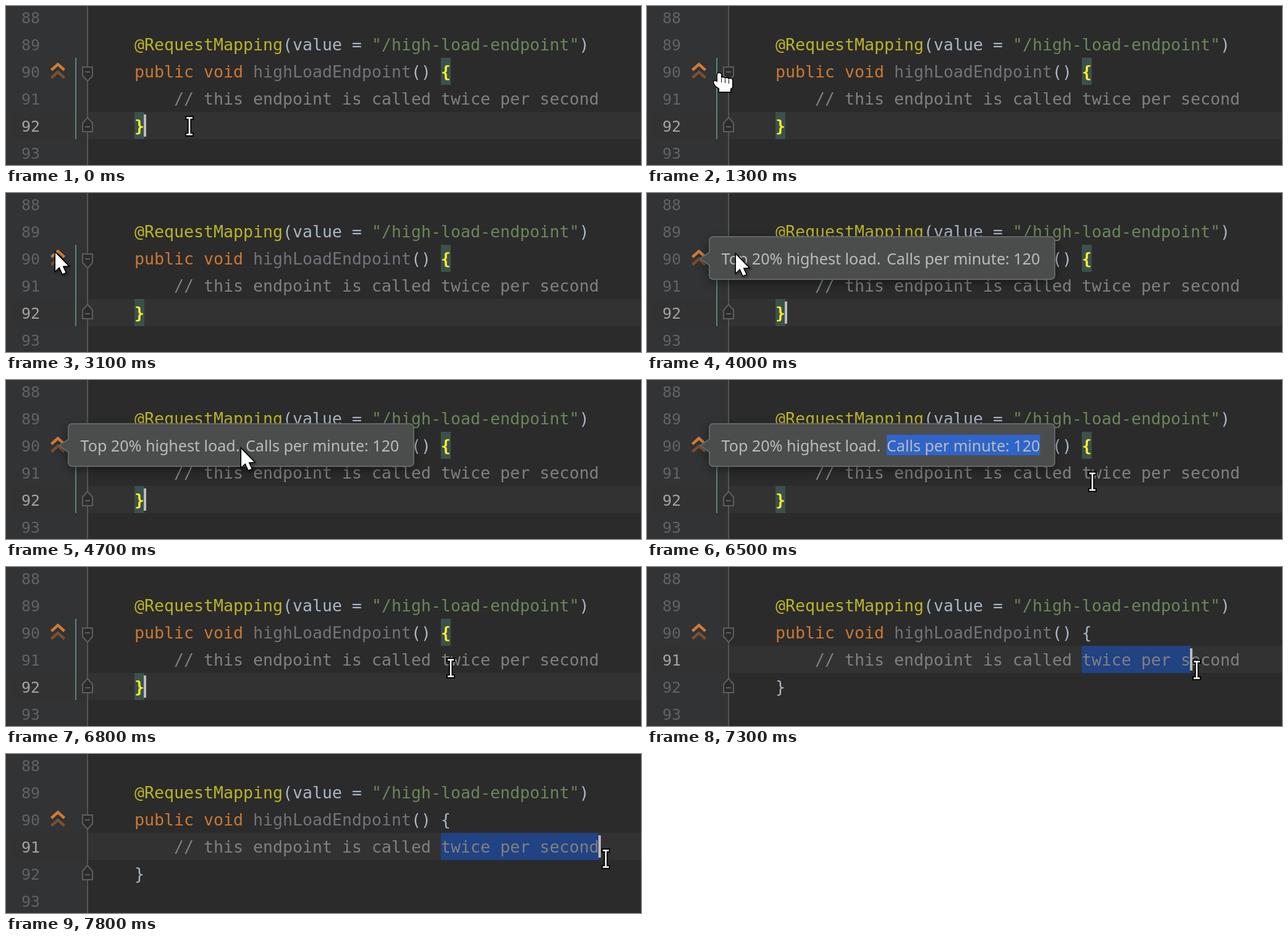
Recreate the animation shown at these times as an HTML page with a canvas. Size 1028 by 258 pixels, loop 8000 ms.

```html
<!DOCTYPE html>
<html lang="en">
<head>
<meta charset="utf-8">
<title>Endpoint load hint</title>
<style>
  html, body { margin: 0; width: 100%; height: 100%; overflow: hidden; background: #2b2b2b; }
  canvas { display: block; }
</style>
</head>
<body>
<canvas id="stage" width="1028" height="258"></canvas>
<script>
const ctx = document.getElementById('stage').getContext('2d');
const LOOP = 8000, STEP = 100, BLINK = 500;
const COL = 16, ROW = 44, LEFT = 208;
const MONO = '"DejaVu Sans Mono", monospace';
const CODE_FONT = '26.58px ' + MONO;
const LINE_FONT = '25px ' + MONO;
const HINT_FONT = '25.1px "Noto Sans", sans-serif';
const C = {
  bg: '#2b2b2b', gutter: '#313335', row: '#323232', fold: '#5c5e60',
  note: '#bbb529', key: '#cc7832', plain: '#a9b7c6', str: '#6a8759',
  dim: '#72737a', comment: '#808080', brace: '#ffef28', braceBg: '#3b514d',
  select: '#214283', hintSelect: '#2f65ca', scope: '#5a8577', caret: '#bbbbbb'
};

const settle = k => 1 - (1 - k) ** 2;
const smooth = k => k * k * (3 - 2 * k);
const glide = (from, to, x, y, ease = settle) => ({ from, to, x, y, ease });
const HOME = { x: 297, y: 195 };
const GLIDES = [
  glide(1000, 1500, 81, 94),
  glide(2100, 2300, 79, 95),
  glide(3900, 4800, 384, 110),
  glide(5000, 5600, 645, 110, smooth),
  glide(6100, 6500, 721, 165),
  glide(6500, 6700, 768, 169),
  glide(6700, 6800, 720, 164),
  glide(6900, 7500, 950, 168, smooth),
  glide(7600, 7800, 971, 170)
];
const HINT_FROM = 3600, HINT_TO = 6800, DRAG_HINT = 5100, DRAG_CODE = 7000;

const clamp = (v, lo, hi) => Math.max(lo, Math.min(hi, v));

function mouseAt(t) {
  let { x, y } = HOME;
  for (const g of GLIDES) {
    const k = g.ease(clamp((t - g.from) / (g.to - g.from), 0, 1));
    x += (g.x - x) * k;
    y += (g.y - y) * k;
  }
  return { x: Math.round(x), y: Math.round(y) };
}

const rowTop = n => (n - 88) * ROW - 4;
const colX = c => LEFT + c * COL;

function box(color, x, y, w, h) {
  ctx.fillStyle = color;
  ctx.fillRect(x, y, w, h);
}

function text(s, x, y, color, font) {
  ctx.font = font;
  ctx.fillStyle = color;
  ctx.fillText(s, x, y);
}

function code(line, col, s, color, weight = '') {
  text(s, colX(col), rowTop(line) + 32, color, weight + CODE_FONT);
}

function trace(points, close) {
  ctx.beginPath();
  points.forEach(([x, y]) => ctx.lineTo(x, y));
  if (close) ctx.closePath();
}

function stroke(color, width) {
  ctx.strokeStyle = color;
  ctx.lineWidth = width;
  ctx.stroke();
}

function foldMark(y, dir) {
  trace([[124, y - 8 * dir], [140, y - 8 * dir], [140, y + 6 * dir], [132, y + 15 * dir], [124, y + 6 * dir]], true);
  ctx.fillStyle = C.bg;
  ctx.fill();
  stroke(C.fold, 2);
  trace([[128, y], [136, y]]);
  stroke(C.fold, 2);
}

function chevron(y, color) {
  trace([[73.5, y + 9.5], [84, y], [94.5, y + 9.5]]);
  stroke(color, 4.5);
}

function drawGutter(current) {
  box(C.gutter, 0, 0, 131, 258);
  box(C.row, 8, rowTop(current), 1020, ROW);
  box('#555555', 131, 0, 2, 258);
  if (current === 92) box(C.scope, 112, 84, 2, 132);
  for (let n = 88; n <= 93; n++)
    text(n, 25, rowTop(n) + 32, n === current ? '#a4a3a3' : '#606366', LINE_FONT);
  chevron(107, '#794f30');
  chevron(94.5, '#d07a35');
  foldMark(107, 1);
  foldMark(196, -1);
}

function drawCode(current, selectEnd) {
  const matched = current === 92;
  if (matched) {
    box(C.braceBg, colX(31), rowTop(90), COL, ROW);
    box(C.braceBg, colX(0), rowTop(92), COL, ROW);
  } else {
    box(C.select, colX(31), rowTop(91), colX(selectEnd) - colX(31), ROW);
  }
  const brace = matched ? C.brace : C.plain, weight = matched ? 'bold ' : '';
  code(89, 0, '@RequestMapping', C.note);
  code(89, 15, '(value = ', C.plain);
  code(89, 24, '"/high-load-endpoint"', C.str);
  code(89, 45, ')', C.plain);
  code(90, 0, 'public void', C.key);
  code(90, 12, 'highLoadEndpoint', C.dim);
  code(90, 28, '()', C.plain);
  code(90, 31, '{', brace, weight);
  code(91, 4, '// this endpoint is called twice per second', C.comment);
  code(92, 0, '}', brace, weight);
}

function hintShape() {
  const l = 101, r = 660, top = 71, bottom = 140, rad = 6;
  ctx.beginPath();
  ctx.moveTo(l + rad, top);
  ctx.arcTo(r, top, r, bottom, rad);
  ctx.arcTo(r, bottom, l, bottom, rad);
  ctx.arcTo(l, bottom, l, top, rad);
  ctx.lineTo(l, 117);
  ctx.lineTo(86, 106.5);
  ctx.lineTo(l, 96);
  ctx.arcTo(l, top, r, top, rad);
  ctx.closePath();
}

function drawHint(t, mouse) {
  ctx.save();
  hintShape();
  ctx.shadowColor = 'rgba(0,0,0,.45)';
  ctx.shadowBlur = 16;
  ctx.shadowOffsetY = 5;
  ctx.fillStyle = '#4b4d4d';
  ctx.fill();
  ctx.shadowColor = 'transparent';
  stroke('#636667', 2);
  ctx.restore();

  const calls = 'Calls per minute: 120', x = 388;
  if (t >= DRAG_HINT) {
    ctx.font = HINT_FONT;
    const width = n => ctx.measureText(calls.slice(0, n)).width;
    let n = calls.length;
    while (n && x + width(n) > mouse.x) n--;
    box(C.hintSelect, x, 89, width(n), 33);
  }
  text('Top 20% highest load.', 120.5, 116, '#bbbbbb', HINT_FONT);
  text(calls, x, 116, '#bbbbbb', HINT_FONT);
}

function arrow() {
  trace([[1, 2], [1, 31], [7.5, 25], [12.5, 36], [17.5, 34], [12.5, 23.5], [21.5, 23]], true);
  ctx.save();
  ctx.shadowColor = 'rgba(0,0,0,.5)';
  ctx.shadowBlur = 4;
  ctx.shadowOffsetX = ctx.shadowOffsetY = 2;
  stroke('#000', 3);
  ctx.restore();
  ctx.fillStyle = '#fff';
  ctx.fill();
}

function hand() {
  ctx.beginPath();
  ctx.roundRect(-2, -1, 6, 24, 3);
  for (let i = 0; i < 3; i++) ctx.roundRect(4 + 6 * i, 6 + i, 6, 14, 3);
  ctx.roundRect(-1, 13, 23, 11, 4);
  ctx.rect(1, 20, 18, 9);
  ctx.moveTo(1, 21);
  ctx.ellipse(-3, 17, 3, 6.5, -0.7, 0, Math.PI * 2);
  stroke('#000', 3);
  ctx.fillStyle = '#fff';
  ctx.fill();
  for (let i = 0; i < 3; i++) box('#000', 4 + 6 * i, 8 + i, 1, 6);
}

function beam() {
  for (const [color, width, cap] of [['#000', 6.5, 7], ['#fff', 2.6, 5]]) {
    ctx.beginPath();
    for (const y of [-13.5, 13.5]) {
      ctx.moveTo(-cap, y);
      ctx.lineTo(cap, y);
    }
    ctx.moveTo(0, -13.5);
    ctx.lineTo(0, 13.5);
    stroke(color, width);
  }
}

function drawMouse({ x, y }, hint) {
  const onHint = hint && x >= 86 && x <= 661 && y >= 70 && y <= 141;
  ctx.save();
  ctx.translate(x, y);
  if (onHint || x < 112) arrow();
  else if (x < 142) hand();
  else beam();
  ctx.restore();
}

function draw(t) {
  const mouse = mouseAt(t);
  const dragging = t >= DRAG_CODE;
  const current = dragging ? 91 : 92;
  const caretCol = dragging ? clamp(Math.floor((mouse.x - LEFT - 4) / COL), 31, 47) : 1;
  const caretOn = dragging || Math.floor((t + BLINK - 100) / BLINK) % 2 === 0;
  const hint = t >= HINT_FROM && t < HINT_TO;

  box(C.bg, 0, 0, 1028, 258);
  drawGutter(current);
  drawCode(current, caretCol);
  if (caretOn) box(C.caret, colX(caretCol) - 1, rowTop(current) + 4, 4, 36);
  if (hint) drawHint(t, mouse);
  drawMouse(mouse, hint);
}

const start = performance.now();
function tick() {
  const t = (performance.now() - start) % LOOP;
  draw(Math.floor(t / STEP) * STEP);
  requestAnimationFrame(tick);
}
tick();
</script>
</body>
</html>
```
